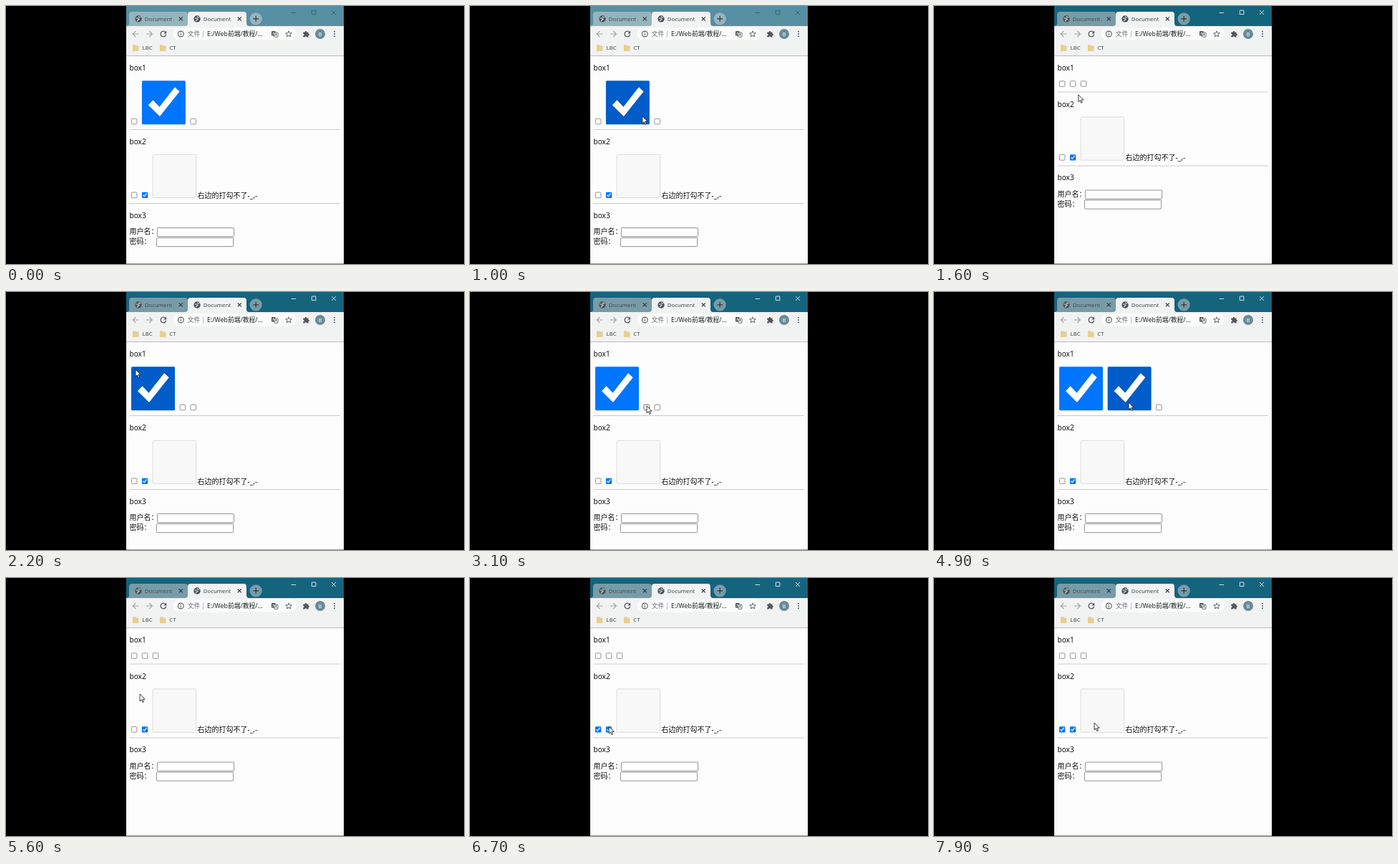
Write an HTML page that moves like this. It is 640x360 px and loops after 8000 ms.

```html
<!DOCTYPE html>
<html lang="zh">
<head>
<meta charset="utf-8">
<title>Checkbox demo</title>
<style>
html, body { margin: 0; width: 100%; height: 100%; overflow: hidden; background: #000; }
svg { display: block; width: 100vw; height: 100vh; }
text { font-family: "Noto Sans", "Noto Sans CJK SC", "Noto Sans CJK", sans-serif; white-space: pre; }
.page { font-size: 10px; fill: #111; }
.ui { font-size: 7.8px; fill: #454b50; }
.line { fill: none; stroke: #50565b; stroke-width: 1.1; }
.field { fill: #fff; stroke: #767676; stroke-width: .8; }
</style>
</head>
<body>
<svg id="stage" viewBox="0 0 640 360"></svg>
<script>
const LOOP = 8000, STEP = 100;
const SMALL = 8.3, BIG = 61, GAP = 6.6, LEFT = 175, BASE = 165.2, COLLAPSE = 52.5;

// Pointer stops: time, x, y
const stops = [
  [400, 300, 352], [900, 241, 154], [1300, 240, 153], [1800, 181, 108], [2200, 181, 108],
  [2800, 247, 159], [3300, 247, 159], [3700, 315, 160], [4000, 315, 160], [4200, 324, 149],
  [4500, 324, 149], [4800, 272, 154], [5000, 272, 154], [5300, 187, 162], [5600, 187, 162],
  [6100, 178, 210], [6500, 178, 210], [7000, 224, 202]
];
// Toggles: time, box index (0-2 first row, 3 second row)
const clicks = [[1300, 1], [2000, 0], [3200, 1], [3900, 2], [4500, 2], [5000, 1], [5400, 0], [6300, 3]];
const ACTIVE_AT = 1300;

const rect = (x, y, w, h, fill, rx = 0, extra = '') =>
  `<rect x="${x}" y="${y}" width="${w}" height="${h}" rx="${rx}" fill="${fill}" ${extra}/>`;
const text = (x, y, str, cls = 'page', style = '') =>
  `<text x="${x}" y="${y}" class="${cls}" style="${style}">${str}</text>`;
const path = (d, extra = 'class="line"') => `<path d="${d}" ${extra}/>`;
const rule = y => rect(172.5, y, 294.5, 1, '#cbcbcb');

function checkbox(x, bottom, size, on, hover) {
  const y = bottom - size;
  if (!on) return rect(x + .35, y + .35, size - .7, size - .7, '#fff', 1.3,
    `stroke="${hover ? '#444' : '#767676'}" stroke-width=".8"`);
  return rect(x, y, size, size, hover ? '#005cc8' : '#0075ff', size > 20 ? 1.5 : 1.2) +
    `<path transform="translate(${x} ${y}) scale(${size / BIG})" fill="#fff" d="M9 34L15.5 27L24.5 36.5L46 9L52.7 15L25 49.7Z"/>`;
}

function tab(x, fill) {
  return path(`M${x - 4} 28Q${x} 28 ${x} 24V12Q${x} 8 ${x + 4} 8H${x + 78}Q${x + 82} 8 ${x + 82} 12V24Q${x + 82} 28 ${x + 86} 28Z`, `fill="${fill}"`) +
    `<circle cx="${x + 13}" cy="18" r="4.7" fill="#485158"/>` +
    path(`M${x + 9.5} 17l3 .2 1.5 1.4-2 1 -.3 2M${x + 13} 14.5l1.2 1.3 2.2-.1`, 'fill="none" stroke="#c6d0d4" stroke-width="1.2"') +
    text(x + 21.8, 20.9, 'Document', 'ui') +
    path(`M${x + 69.8} 15.3l5 5m0-5l-5 5`, 'stroke="#30383d" stroke-width="1.2"');
}

function header(active) {
  const ctl = active ? '#e8f0f2' : '#34606f';
  return rect(168, 0, 304, 28.5, active ? '#14647d' : '#578fa3') +
    tab(172, active ? '#779ca8' : '#94b4be') + tab(254, '#f1f2f2') +
    `<circle cx="349.2" cy="17.8" r="8.6" fill="${active ? '#779ca8' : '#94b4be'}"/>` +
    path('M345.4 17.8h7.6m-3.8-3.8v7.6', 'stroke="#30383d" stroke-width="1.2"') +
    path('M398.5 9.5h6.5M427.3 6h5.6v5.6h-5.6zM455 6l6 6m0-6l-6 6', `fill="none" stroke="${ctl}" stroke-width=".9"`);
}

const folder = x => path(`M${x} 54.3h4l1 1.2h3.4v7.4h-8.4z`, 'fill="#e8cf8d"');

const toolbar = rect(168, 28, 304, 41.5, '#f1f2f2') + rect(168, 69, 304, 1, '#b9bbbc') +
  path('M185.5 39h-8.3m4-4l-4 4 4 4M196 39h8.3m-4-4l4 4-4 4', 'fill="none" stroke="#a2a5a8" stroke-width="1.1"') +
  path('M222.9 36.6a3.8 3.8 0 1 0 .8 3', 'class="line" style="stroke-width:1.3"') +
  path('M224.2 34.6v3.8h-3.8z', 'fill="#50565b"') +
  rect(233.5, 30, 172.5, 17.5, '#fbfbfb', 8.7) +
  '<circle cx="244.3" cy="39" r="3.9" class="line"/>' + path('M244.3 38.5v2.7m0-4.5v1') +
  text(253.7, 42.2, '文件', 'ui', 'font-size:8.7px;fill:#686d70') +
  rect(275, 34.3, .8, 9.4, '#a9adaf') +
  text(281, 42.2, 'E:/Web前端/教程/…', 'ui', 'font-size:8.8px;fill:#202427') +
  rect(371, 35, 5.6, 6.6, '#50565b', .7) + rect(375, 37, 5, 6.3, '#fbfbfb', .6, 'stroke="#50565b" stroke-width=".8"') +
  path('M376.2 39h2.8m-1.4-.8v.8q0 1.7-1.3 2.5m.4-1.5l2 1.5', 'class="line" style="stroke-width:.7"') +
  path('M372.4 40l1.3-3.4 1.3 3.4', 'fill="none" stroke="#fff" stroke-width=".7"') +
  path('M395 34.8l1.2 2.9 3.1.2-2.4 2 .8 3-2.7-1.7-2.7 1.7.8-3-2.4-2 3.1-.2z', 'class="line" style="stroke-width:.9"') +
  path('M415.3 36.4h2.3a1.3 1.3 0 1 1 2.6 0h2.3v2.3a1.3 1.3 0 1 1 0 2.6v2.3h-2.3a1.2 1.2 0 1 0-2.6 0h-2.3v-2.3a1.3 1.3 0 1 0 0-2.6z', 'fill="#50565b"') +
  '<circle cx="439" cy="39" r="7" fill="#688b98"/>' + text(436.8, 41.6, 'B', 'ui', 'font-size:7.2px;fill:#fff') +
  [35.8, 39, 42.2].map(y => `<circle cx="459" cy="${y}" r=".95" fill="#50565b"/>`).join('') +
  folder(177) + text(190.6, 61.4, 'LBC', 'ui') + folder(215) + text(228.3, 61.4, 'CT', 'ui');

const form = rule(172) + text(172.6, 193.2, 'box2') +
  rect(205.2, 207.3, 60.4, 60.4, '#f8f8f8', 1.5, 'stroke="#d3d3d3" stroke-width=".8"') +
  text(267.6, 267.7, '右边的打勾不了-_,-') +
  rule(275) + text(172.6, 295.8, 'box3') +
  text(172.6, 318.4, '用户名：') + rect(211.4, 309.5, 107.2, 12.2, '', 1, 'class="field"') +
  text(172.6, 332.2, '密码：') + rect(210.4, 323.4, 107.2, 12.2, '', 1, 'class="field"');

document.getElementById('stage').innerHTML =
  rect(0, 0, 640, 360, '#000') + rect(168, 0, 304, 360, '#fdfdfd') + '<g id="header"></g>' + toolbar +
  text(172.6, 90.3, 'box1') + '<g id="row"></g><g id="rest">' + form + '<g id="pair"></g></g>' +
  rect(168, 359, 304, 1, '#8d9ea5') +
  path('M0 0V9.9L2.3 7.8L3.9 11.5L5.5 10.8L3.9 7.2H7.1Z', 'id="pointer" fill="#fff" stroke="#111" stroke-width=".8"');

const [head, row, rest, pair, pointer] =
  ['header', 'row', 'rest', 'pair', 'pointer'].map(id => document.getElementById(id));

function pointerAt(t) {
  if (t < stops[0][0]) return null;
  const i = stops.findIndex(s => s[0] > t);
  if (i < 0) return stops[stops.length - 1].slice(1);
  const [t0, x0, y0] = stops[i - 1], [t1, x1, y1] = stops[i];
  const u = (t - t0) / (t1 - t0), k = u * u * (3 - 2 * u);
  return [x0 + (x1 - x0) * k, y0 + (y1 - y0) * k];
}

function draw(t) {
  const on = [false, true, false, false];
  for (const [at, i] of clicks) if (t >= at) on[i] = !on[i];
  const p = pointerAt(t);
  const over = (x, bottom, size) => !!p && p[0] >= x && p[0] <= x + size && p[1] >= bottom - size && p[1] <= bottom;
  const shift = on[0] || on[1] || on[2] ? 0 : -COLLAPSE;

  head.innerHTML = header(t >= ACTIVE_AT);
  let x = LEFT, boxes = '';
  for (let i = 0; i < 3; i++) {
    const size = on[i] ? BIG : SMALL, bottom = BASE + shift;
    boxes += checkbox(x, bottom, size, on[i], over(x, bottom, size));
    x += size + GAP;
  }
  row.innerHTML = boxes;
  rest.setAttribute('transform', `translate(0 ${shift})`);
  pair.innerHTML = [on[3], true].map((checked, i) => {
    const bx = LEFT + i * (SMALL + GAP), bottom = BASE + 102.8;
    return checkbox(bx, bottom, SMALL, checked, over(bx, bottom + shift, SMALL));
  }).join('');
  pointer.setAttribute('visibility', p ? 'visible' : 'hidden');
  if (p) pointer.setAttribute('transform', `translate(${p[0]} ${p[1]})`);
}

const start = performance.now();
let last = -1;
function tick() {
  const t = Math.floor((performance.now() - start) % LOOP / STEP) * STEP;
  if (t !== last) draw(last = t);
  requestAnimationFrame(tick);
}
tick();
</script>
</body>
</html>
```
